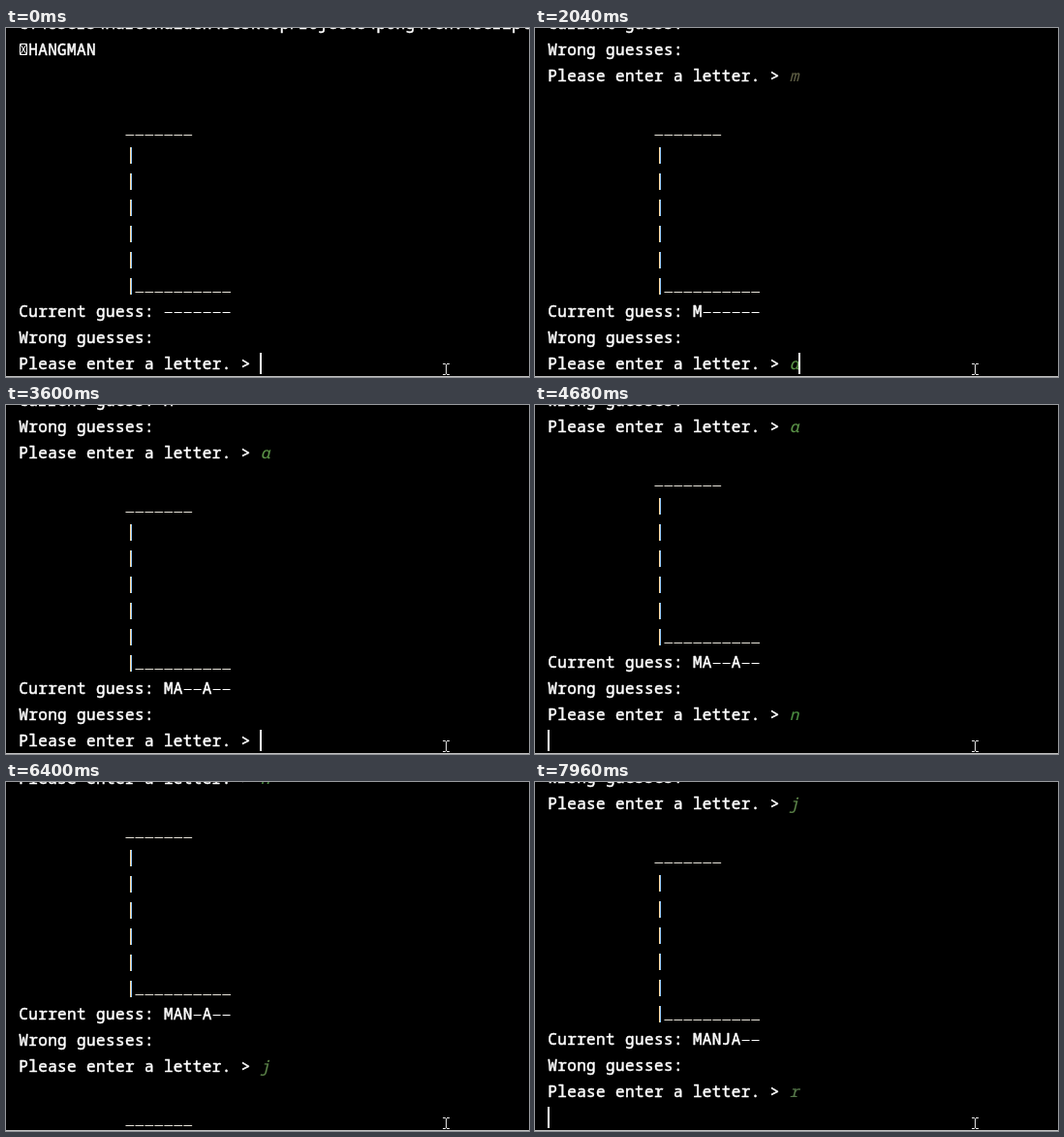
Recreate the animation shown at these times as an HTML page with a canvas. Size 540 px wide and 360 px high, loop 8000 ms.

```html
<!DOCTYPE html>
<html lang="en">
<head>
<meta charset="utf-8">
<title>Hangman terminal</title>
<style>
  html, body { margin: 0; width: 100%; height: 100%; overflow: hidden; background: #000; }
  canvas { display: block; width: 540px; height: 360px; }
</style>
</head>
<body>
<canvas id="stage" width="540" height="360"></canvas>
<script>
const ctx = document.getElementById('stage').getContext('2d');
const LOOP = 8000, CELL = 9.98, LINE = 27, LEFT = 13;
const PROMPT = 'Please enter a letter. > ';
const HEAD = 3, BLOCK = 11;
const INK = '#fff', RULE = '#e6e2d8';

// One entry per guess; times in ms. The caret is hidden from off to on.
const rounds = [
  { word: '-------', key: 'm', tint: '#5e5e45', start: 0,    off: 80,   on: 240,  type: 240,  enter: 1100, print: 1340 },
  { word: 'M------', key: 'a', tint: '#5a9247', start: 1420, off: 2040, on: 2040, type: 2040, enter: 2420, print: 2580 },
  { word: 'MA--A--', key: 'n', tint: '#4c8f42', start: 2660, off: 3120, on: 3600, type: 3900, enter: 4600, settle: 4680, print: 4920 },
  { word: 'MAN-A--', key: 'j', tint: '#5c8449', start: 5000, off: 5620, on: 5780, type: 5780, enter: 6240, print: 6400, flush: 6480 },
  { word: 'MANJA--', key: 'r', tint: '#56784a', start: 6560, off: 7100, on: 7580, type: 7580, enter: 7960, print: LOOP }
];

const indent = ' '.repeat(11);
const lines = ['C:\\Users\\MarcoHalden\\DesktopProjects\\pong\\venv\\Scripts\\python.exe', '\u2327HANGMAN', ''];
for (const r of rounds) {
  lines.push('', indent + '_'.repeat(7), ...Array(5).fill(indent + '|'),
    indent + '|' + '_'.repeat(10), 'Current guess: ' + r.word, 'Wrong guesses:', PROMPT);
}
lines.push('');

function stateAt(t) {
  const k = rounds.findLastIndex(r => r.start <= t);
  const r = rounds[k];
  const base = k * BLOCK * LINE, count = HEAD + BLOCK * (k + 1);
  const typed = t >= r.type ? k + 1 : k;
  if (t >= r.flush) return { scroll: base + BLOCK * LINE - 1, count: count + BLOCK, typed, col: -1 };
  if (t >= r.print) return { scroll: base + 2 * LINE - 1, count: count + 2, typed, col: -1 };
  if (t >= r.enter) return { scroll: base + LINE - (t < r.settle ? 1 : 0), count: count + 1, typed, col: 0 };
  const end = PROMPT.length;
  const col = t >= r.type ? end + 1 : t >= r.off && t < r.on ? -1 : end;
  return { scroll: base, count, typed, col };
}

function box(x, y, w, h, color) {
  ctx.fillStyle = color;
  ctx.fillRect(x, y, w, h);
}

function missingGlyph(x, y) {
  ctx.strokeStyle = INK;
  ctx.lineWidth = 1;
  ctx.strokeRect(x + 1.5, y - 5.5, 7, 11);
  ctx.beginPath();
  ctx.moveTo(x + 2, y - 5);
  ctx.lineTo(x + 8, y + 5);
  ctx.moveTo(x + 8, y - 5);
  ctx.lineTo(x + 2, y + 5);
  ctx.stroke();
}

// The bar is two pixels wide with warm and cool subpixel fringes.
function bar(x, y) {
  box(x, y, 1, 17, '#ffd398');
  box(x + 1, y, 1, 17, '#98ceff');
}

function letter(ch, x, y, color, weight) {
  ctx.fillStyle = ctx.strokeStyle = color;
  ctx.lineWidth = weight;
  ctx.fillText(ch, x, y);
  ctx.strokeText(ch, x, y);
}

function glyph(ch, col, y, color = INK, weight = 0.5) {
  const x = LEFT + col * CELL;
  if (ch === ' ') return;
  if (ch === '_') box(x + 0.7, y + 7, 8.8, 1, RULE);
  else if (ch === '|') bar(Math.round(x + CELL / 2), y - 7);
  else if (ch === '-') box(x + 1, y + 1, 8, 1, INK);
  else if (ch === '\u2327') missingGlyph(x, y);
  else letter(ch, x + CELL / 2, y + 6, color, weight);
}

function setFont(style) {
  ctx.font = style + ' 16px "Noto Sans Mono", "DejaVu Sans Mono", monospace';
}

function pointer() {
  const c = '#e4e4e4';
  for (const y of [346, 357]) {
    box(451, y, 3, 1, c);
    box(455, y, 3, 1, c);
  }
  box(454, 347, 1, 10, c);
}

function draw(t) {
  const s = stateAt(t);
  const rowY = i => -5 + i * LINE - s.scroll;
  box(0, 0, 540, 360, '#000');
  ctx.textAlign = 'center';
  ctx.lineJoin = 'round';

  setFont('normal');
  for (let i = 0; i < s.count; i++) {
    const y = rowY(i);
    if (y > -20 && y < 380) [...lines[i]].forEach((ch, col) => glyph(ch, col, y));
  }

  setFont('italic');
  for (let k = 0; k < s.typed; k++) {
    const { key, tint } = rounds[k];
    // the italic a is single-storey
    glyph(key === 'a' ? '\u0251' : key, PROMPT.length, rowY(HEAD + BLOCK * (k + 1) - 1), tint, 0.2);
  }

  if (s.col >= 0) box(Math.floor(LEFT + s.col * CELL), rowY(s.count - 1) - 11, 2, 22, INK);
  pointer();
  box(0, 359, 540, 1, '#c0c0c0');
}

const began = performance.now();
function tick() {
  draw((performance.now() - began) % LOOP);
  requestAnimationFrame(tick);
}
tick();
</script>
</body>
</html>
```
